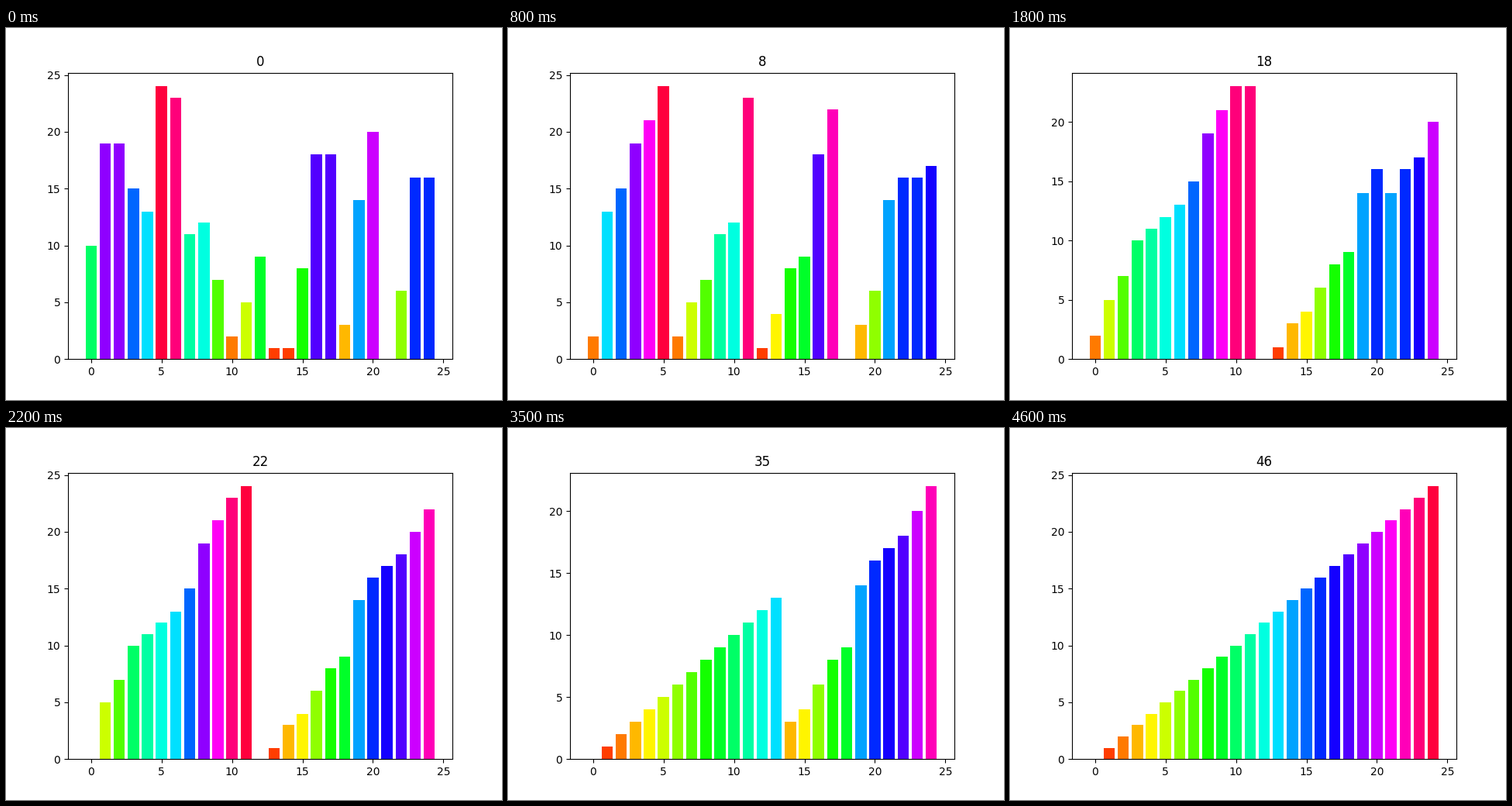
These frames come from a looping animation (640 px wide and 480 px high, 4.7 s). A matplotlib script:

```python
import colorsys

import matplotlib.pyplot as plt
from matplotlib.animation import FuncAnimation

VALUES = [10, 21, 19, 15, 13, 24, 23, 11, 12, 7, 2, 5, 9,
          4, 1, 8, 22, 18, 3, 14, 20, 0, 6, 17, 16]
N = len(VALUES)
COLORS = [colorsys.hsv_to_rgb(v / N, 1, 1) for v in range(N)]


def plan_merges(lo, hi, writes):
    """Schedule the writes of a parallel merge sort; return the last step."""
    if hi - lo < 2:
        return 0
    mid = (lo + hi) // 2
    # A merge begins on the step where its slower half writes its last item.
    start = max(plan_merges(lo, mid, writes), plan_merges(mid, hi, writes))
    for k, value in enumerate(sorted(VALUES[lo:hi])):
        writes.append((start + k, lo + k, value))
    return start + hi - lo - 1


def build_states():
    writes = []
    last = plan_merges(0, N, writes)
    data, states = VALUES[:], []
    for step in range(last + 1):
        for when, index, value in writes:
            if when == step:
                data[index] = value
        states.append(data[:])
    return states


states = build_states()
fig, ax = plt.subplots(figsize=(6.4, 4.8), dpi=100)


def draw(step):
    ax.clear()
    data = states[step]
    ax.bar(range(N), data, color=[COLORS[v] for v in data])
    ax.set_title(str(step))


anim = FuncAnimation(fig, draw, frames=len(states), interval=100, repeat=True)
plt.show()
```
